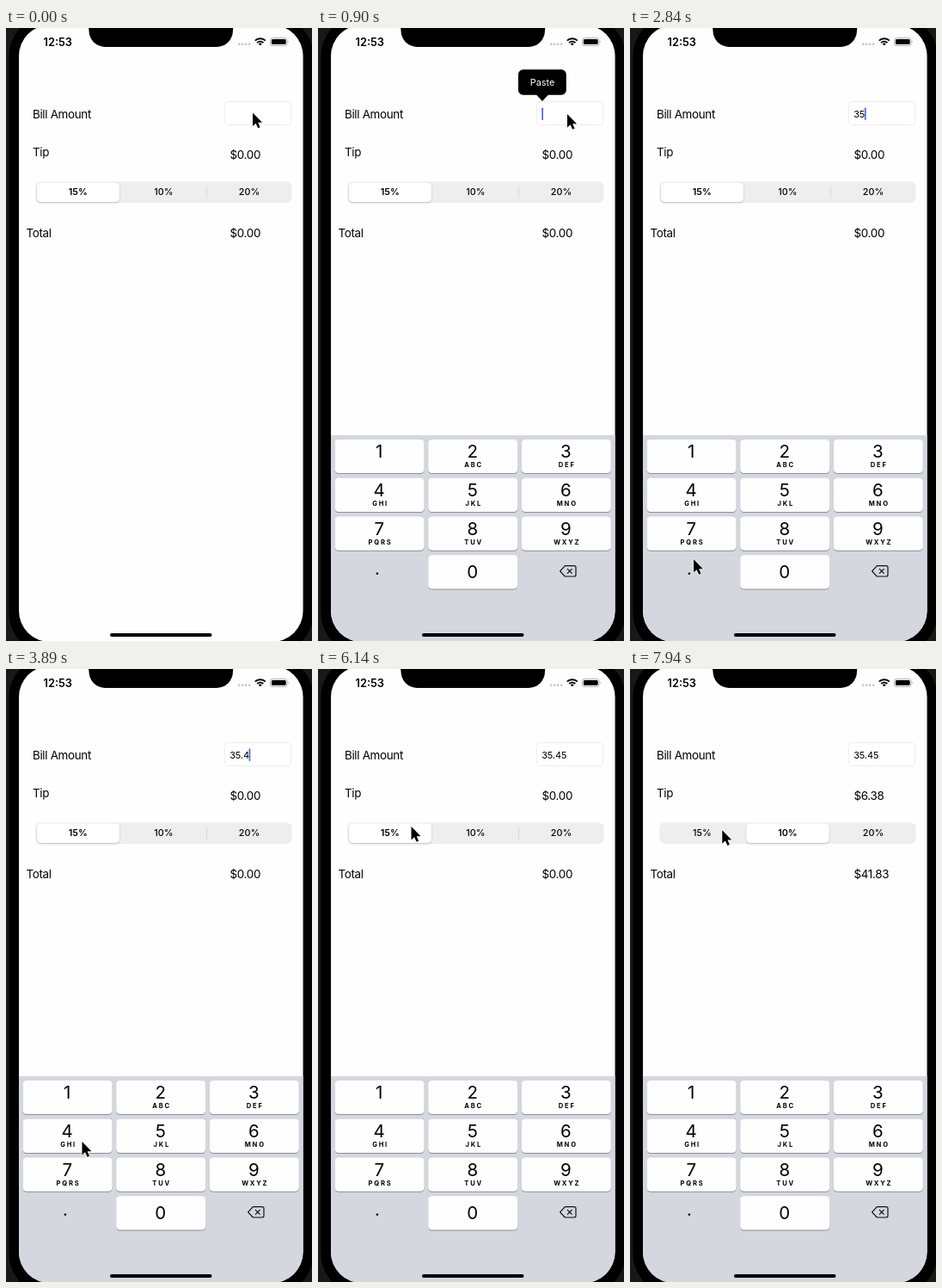
These frames come from a looping animation (356x712 px, 8000 ms). An HTML page:

```html
<!DOCTYPE html>
<html lang="en">
<head>
<meta charset="utf-8">
<title>Tip calculator</title>
<style>
  html, body { margin: 0; width: 100%; height: 100%; overflow: hidden; background: #000; }
  svg { display: block; width: 356px; height: 712px; font-family: Inter, "Liberation Sans", sans-serif; }
  .label { font-size: 13.4px; letter-spacing: -0.32px; }
  .seg { font-size: 10.8px; font-weight: 500; text-anchor: middle; }
  .digit { font-size: 20.5px; text-anchor: middle; }
  .letters { font-size: 7.6px; font-weight: 700; letter-spacing: 1.8px; text-anchor: middle; }
</style>
</head>
<body>
<svg viewBox="0 0 356 712">
  <defs>
    <clipPath id="screen"><rect x="15" y="-3.5" width="330.6" height="716.5" rx="36"/></clipPath>
    <filter id="soft" x="-20%" y="-30%" width="140%" height="170%">
      <feDropShadow dx="0" dy="1.2" stdDeviation="1.3" flood-opacity="0.2"/>
    </filter>
  </defs>

  <rect width="356" height="712" fill="#181818"/>
  <rect x="3.5" y="-14" width="354" height="740" rx="46"/>

  <g clip-path="url(#screen)">
    <rect width="356" height="712" fill="#fefefe"/>
    <path d="M88-4H272C266-4 264-2 264 3A19 19 0 0 1 245 22H115.500A19 19 0 0 1 96.500 3C96.500-2 94-4 88-4Z"/>

    <text x="43.500" y="20.700" font-size="12.800" font-weight="600">12:53</text>
    <g id="dots" fill="#c6c6c8"></g>
    <g fill="none" stroke="#000" stroke-width="2">
      <path d="M289.800 14.600A8.600 8.600 0 0 1 301.800 14.600"/>
      <path d="M292.200 17.100A5.200 5.200 0 0 1 299.400 17.100"/>
    </g>
    <path d="M293.800 18.300A3 3 0 0 1 297.800 18.300L295.800 20.500Z"/>
    <rect x="307.500" y="11.700" width="19.600" height="8.800" rx="2.600" fill="none" stroke="#a8a8a8" stroke-width="0.900"/>
    <rect x="308.900" y="13.100" width="16.800" height="6" rx="1.500"/>
    <path d="M328.100 14.600Q329.700 16.100 328.100 17.600Z" fill="#a0a0a0"/>

    <g class="label">
      <text x="31" y="105">Bill Amount</text>
      <text x="31" y="148.500">Tip</text>
      <text x="23.500" y="243">Total</text>
      <text id="tip" x="260.500" y="152"></text>
      <text id="total" x="260.500" y="243"></text>
    </g>

    <rect x="254.500" y="85.500" width="77" height="27" rx="4" fill="#fff" stroke="#ededee"/>
    <text id="amount" x="260.200" y="103.500" font-size="11" letter-spacing="-0.150"></text>
    <rect id="caret" y="92.500" width="1.700" height="14.500" rx="0.800" fill="#4765f0"/>

    <rect x="34.300" y="178.300" width="298.300" height="24.700" rx="6" fill="#eeeeef"/>
    <rect id="divider" x="233" y="184" width="1" height="14" fill="#d7d7d9"/>
    <rect id="pill" filter="url(#soft)" x="-48" y="-11.300" width="96" height="22.600" rx="5" fill="#fff"/>
    <g id="segs"></g>

    <g id="paste">
      <path d="M253.500 77L261 85L268.500 77Z"/>
      <rect x="233" y="48.300" width="55.800" height="29.400" rx="5.500"/>
      <text x="261" y="67" font-size="10.900" fill="#fff" text-anchor="middle">Paste</text>
    </g>

    <g id="keyboard">
      <rect x="15" y="473" width="331" height="240" fill="#d4d7de"/>
      <g id="keys"></g>
      <text class="digit" x="69" y="635.400">.</text>
      <g fill="none" stroke="#111" stroke-width="1.200" stroke-linejoin="round" stroke-linecap="round">
        <path d="M287.300 624.700H298Q300 624.700 300 626.700V635Q300 637 298 637H287.300L281.600 630.800Z"/>
        <path d="M290.300 628.300L295.300 633.300M295.300 628.300L290.300 633.300"/>
      </g>
    </g>
    <rect x="121" y="703" width="118.500" height="4" rx="2"/>
  </g>

  <path id="pointer" d="M0 0V15.500L3.600 12.200L6.100 17.800L8.600 16.700L6.200 11.300H11Z" stroke="#fff" stroke-width="1.300" paint-order="stroke" stroke-linejoin="round"/>
</svg>

<script>
const LOOP = 8000;
const $ = id => document.getElementById(id);

function add(parent, tag, attrs, text) {
  const node = document.createElementNS('http://www.w3.org/2000/svg', tag);
  for (const name in attrs) node.setAttribute(name, attrs[name]);
  if (text) node.textContent = text;
  parent.appendChild(node);
  return node;
}

for (let i = 0; i < 4; i++) add($('dots'), 'circle', { cx: 271.2 + 4 * i, cy: 18.8, r: 1.4 });

const segs = ['15%', '10%', '20%'].map((label, i) =>
  add($('segs'), 'text', { class: 'seg', x: 83.8 + 99.6 * i, y: 194.4 }, label));

const letters = ['', 'ABC', 'DEF', 'GHI', 'JKL', 'MNO', 'PQRS', 'TUV', 'WXYZ'];
const keys = {};

function addKey(digit, col, row, caption) {
  const x = 19.6 + 108.6 * col, y = 477.9 + 44.8 * row, mid = x + 52;
  const size = { x, width: 104, height: 39.2, rx: 4.3 };
  add($('keys'), 'rect', { ...size, y: y + 1, fill: '#8d9095' });
  keys[digit] = add($('keys'), 'rect', { ...size, y });
  add($('keys'), 'text', { class: 'digit', x: mid - 0.4, y: y + (digit ? 21.2 : 26.3) }, String(digit));
  if (caption) add($('keys'), 'text', { class: 'letters', x: mid + 1, y: y + 32.4 }, caption);
}
letters.forEach((caption, i) => addKey(i + 1, i % 3, Math.floor(i / 3), caption));
addKey(0, 1, 3);

// Pointer stops: time, x, y
const path = [
  [0, 287, 98.5], [900, 290, 100], [1200, 290, 100], [1950, 256.5, 498.5],
  [2100, 192, 506.5], [2400, 180, 540], [2550, 180, 541], [2840, 74, 617],
  [3290, 69, 625.5], [3440, 69, 625], [3740, 88, 549], [3890, 88.5, 549],
  [4190, 165, 546], [4340, 165, 546], [5390, 129, 186], [5690, 110, 185],
  [6140, 108.5, 183], [6440, 109, 184], [6890, 170, 188], [7190, 170, 188.5],
  [7790, 108, 188], [7940, 107.3, 187.3]
];

// Key presses: key, press time, time the character appears
const presses = [[3, 1950, 2100], [5, 2550, 2690], ['.', 3140, 3140], [4, 3740, 3890], [5, 4190, 4340]];
const caretX = [260.3, 267, 272.9, 276, 282.6, 289.4];
const focusTime = 600, pasteTime = 750, pickTime = 7040;

const clamp = v => Math.max(0, Math.min(1, v));
const smooth = v => v * v * (3 - 2 * v);
const easeOut = v => 1 - (1 - v) ** 3;

function pointerAt(t) {
  const i = path.findIndex(stop => stop[0] > t);
  if (i < 0) return path[path.length - 1].slice(1);
  const [t0, x0, y0] = path[i - 1], [t1, x1, y1] = path[i];
  const k = smooth((t - t0) / (t1 - t0));
  return [x0 + (x1 - x0) * k, y0 + (y1 - y0) * k];
}

function step(ms) {
  return ms < 2690 ? Math.min(2550, Math.floor(ms / 150) * 150)
                   : Math.floor((ms + 10) / 150) * 150 - 10;
}

function caretAlpha(t, since) {
  if (t < focusTime) return 0;
  const phase = (t - since) % 1000;
  return phase > 900 ? (phase - 900) / 100 : clamp((600 - phase) / 150);
}

function draw(t) {
  const rise = easeOut(clamp((t - 200) / 500));
  $('keyboard').setAttribute('transform', `translate(0 ${240 * (1 - rise)})`);

  const typed = presses.filter(p => t >= p[2]);
  $('amount').textContent = typed.map(p => p[0]).join('');
  $('caret').setAttribute('x', caretX[typed.length]);
  const since = typed.length ? typed[typed.length - 1][2] : focusTime;
  $('caret').setAttribute('opacity', caretAlpha(t, since));
  $('paste').setAttribute('opacity', t < pasteTime ? 0 : clamp((2200 - t) / 200));

  for (const digit in keys) {
    const down = presses.some(p => p[0] == digit && t >= p[1] && t < p[2]);
    keys[digit].setAttribute('fill', down ? '#bbc6d2' : '#fefefe');
  }

  const picked = t >= pickTime;
  const slide = smooth(clamp((t - pickTime + 100) / 300));
  const pressed = t >= 5690 && t < 5900;
  $('pill').setAttribute('transform', `translate(${84 + 99.5 * slide} 190.7) scale(${pressed ? 0.95 : 1})`);
  $('divider').setAttribute('opacity', 1 - slide);
  segs.forEach((seg, i) => seg.style.fontWeight = i === (picked ? 1 : 0) ? 600 : 500);
  $('tip').textContent = picked ? '$6.38' : '$0.00';
  $('total').textContent = picked ? '$41.83' : '$0.00';

  $('pointer').setAttribute('transform', `translate(${pointerAt(t)})`);
}

const start = performance.now();
function tick() {
  draw(step((performance.now() - start) % LOOP));
  requestAnimationFrame(tick);
}
tick();
</script>
</body>
</html>
```
